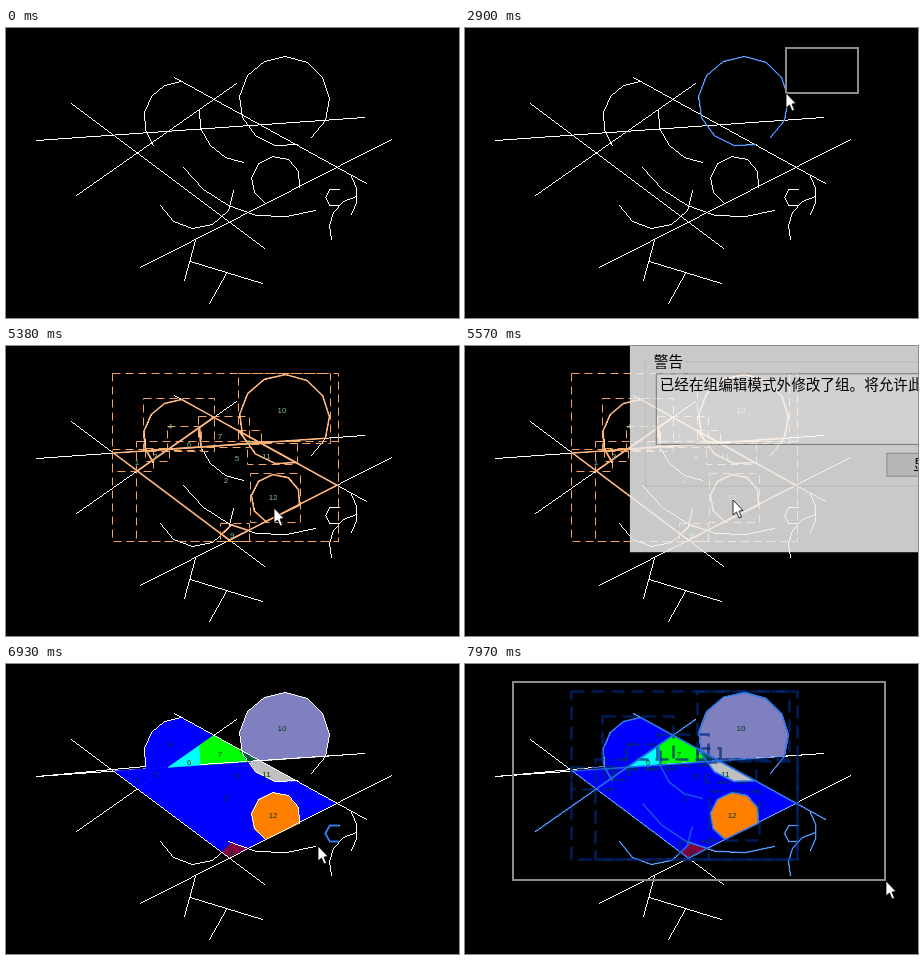
An HTML page with a canvas for the animation above (8 s loop, 453x290 px).

```html
<!DOCTYPE html>
<html lang="zh">
<head>
<meta charset="utf-8">
<style>
html, body { margin: 0; width: 100%; height: 100%; overflow: hidden; background: #000; }
canvas { display: block; }
#dialog {
  position: fixed; left: 163px; top: -20px; width: 646px; height: 227px;
  transform-origin: 323px 98px; background: #f0f0f0; color: #000;
  font: 14.7px/20px "Noto Sans CJK SC", "Noto Sans CJK", sans-serif; white-space: nowrap;
}
#dialog div { position: absolute; box-sizing: border-box; }
#group { left: 15px; top: 35px; width: 600px; height: 126px; border: 1px solid #dcdcdc; }
#title { left: 21px; top: 25px; padding: 0 3px; background: #f0f0f0; }
#text { left: 26px; top: 47px; width: 580px; height: 72px; padding-left: 3px; border: 1px solid #868686; background: #fafafa; }
#button { left: 258px; top: 127px; width: 82px; height: 24px; padding-left: 26px; border: 1px solid #a4a4a4; background: #dadada; }
#pointer { position: fixed; left: 0; top: 0; overflow: visible; }
</style>
</head>
<body>
<canvas id="stage" width="453" height="290"></canvas>
<div id="dialog">
  <div id="group"></div>
  <div id="title">警告</div>
  <div id="text">已经在组编辑模式外修改了组。将允许此操作吗？</div>
  <div id="button">显示</div>
</div>
<svg id="pointer" width="12" height="20">
  <path d="M0 0V15L3.5 12L6 18L8.5 17L6 11L10 10.5Z" fill="#fff" stroke="#000" stroke-width=".8"/>
</svg>
<script>
const byId = id => document.getElementById(id);
const c = byId('stage').getContext('2d');
const dialog = byId('dialog'), arrow = byId('pointer');
const LOOP = 8000;

// Faceted arc: centre, radius, first angle and step in degrees, number of facets
function arc(x, y, r, from, step, n) {
  return Array.from({ length: n + 1 }, (_, i) => {
    const k = (from + i * step) * Math.PI / 180;
    return [x + r * Math.cos(k), y + r * Math.sin(k)];
  });
}

const a = [[30, 112], [358, 89]];
const b = [[65, 75], [258, 220]];
const d = [[168, 49], [360, 155]];
const e = [[134, 239], [385, 111]];
const slant = [[70, 167], [230, 55]];
const stem = [[189, 212], [178, 252]];
const arm = [[184, 233], [256, 255]];
const foot = [[220, 245], [203, 275]];

const left = arc(175, 91, 38, 270, -26.6, 5);
const big = arc(278, 73, 45, 53.3, -28.3, 12);
const small = arc(269.2, 152.4, 24.6, 113.5, 37.4, 7);
const mid = arc(239.2, 87.4, 46.6, 187.6, -23.8, 4);
const long = arc(270.9, 74.7, 113.8, 145.6, -15.05, 5);
const bowl = arc(189, 162, 38, 156.8, -31.4, 5);
const hook = arc(328, 169, 9.2, -60, -60, 4);
const bracket = arc(318, 167, 33, -35, 23.5, 3);
const tail = arc(354.8, 199.6, 32, 261, -25.6, 4);
const lines = [a, b, d, e, slant, stem, arm, foot, left, big, small, mid, long, bowl, hook, bracket, tail];

// Keep the part of a polygon on one side of a line (+1 below, -1 above)
function cut(poly, [[x0, y0], [x1, y1]], side) {
  const dist = ([x, y]) => side * ((x1 - x0) * (y - y0) - (y1 - y0) * (x - x0));
  return poly.flatMap((p, i) => {
    const q = poly[(i + 1) % poly.length], u = dist(p), v = dist(q);
    const kept = u >= 0 ? [p] : [];
    if (u * v < 0) kept.push(p.map((n, j) => n + (q[j] - n) * u / (u - v)));
    return kept;
  });
}

const shape = (poly, ...cuts) => cuts.reduce((rest, [line, side]) => cut(rest, line, side), poly);
const side = (arcPts, i) => arcPts.slice(i, i + 2);

const sheet = [[0, 0], [453, 0], [453, 290], [0, 290]];
const corner = shape(sheet, [a, 1], [b, -1], [slant, -1]);
const wedge = shape(sheet, [a, -1], [slant, 1], [d, 1]);
const inner = cut(wedge, side(mid, 0), -1);

const regions = [
  [1, '#00f', cut(corner, side(left, 4), 1)],
  [3, '#00f', cut(corner, side(left, 4), -1)],
  [4, '#00f', shape(arc(175, 91, 38, 270, -26.6, 13), [a, -1], [slant, -1], [d, 1])],
  [2, '#00f', shape(sheet, [a, 1], [b, -1], [slant, 1], [d, 1], [e, -1])],
  [6, '#0ff', cut(wedge, side(mid, 0), 1)],
  [7, '#0f0', cut(inner, side(big, 9), 1)],
  [8, '#006040', cut(inner, side(big, 9), -1)],
  [10, '#8080c0', shape(big, [a, -1], [d, -1])],
  [11, '#c0c0c0', shape(big, [a, 1], [d, 1])],
  [12, '#ff8000', small],
  [9, '#800040', shape(sheet, [e, -1], [b, -1], [side(long, 2), 1], [side(bowl, 3), 1])]
].map(([label, color, pts]) => ({ label, color, pts }));

const group = regions.flatMap(r => r.pts);
const edges = [b, d, e, [a[0], left[4]], [regions[4].pts[0], a[1]], left.slice(0, 5), big, small, long.slice(2)];

// Pointer runs of [time, x, y]; hidden between runs
const runs = [
  [[270, 281, 162], [320, 30, 217], [370, 30, 217]],
  [[1970, 435, 148], [2330, 322, 237], [2490, 322, 237], [2660, 401, 90], [2770, 393, 20],
    [3230, 30, 250], [3520, 30, 250], [3800, 18, 257]],
  [[4820, 155, 56], [4970, 323, 145], [5100, 268, 162], [5380, 268, 162], [5500, 268, 154],
    [5620, 268, 154], [5950, 462, 118]],
  [[6600, 462, 120], [6760, 380, 195], [6930, 312, 182], [7300, 48, 18], [7940, 421, 217], [LOOP, 421, 217]]
];

const clamp = v => Math.max(0, Math.min(1, v));
const smooth = v => v * v * (3 - 2 * v);

function pointer(t) {
  const run = runs.find(r => t >= r[0][0] && t < r[r.length - 1][0]);
  if (!run) return null;
  const i = run.findIndex(k => k[0] > t);
  const [t0, x0, y0] = run[i - 1], [t1, x1, y1] = run[i];
  const k = smooth((t - t0) / (t1 - t0));
  return [Math.round(x0 + (x1 - x0) * k), Math.round(y0 + (y1 - y0) * k)];
}

// Whole pixels along a polyline
function pixels(pts) {
  const ends = pts.map(p => p.map(Math.round));
  return ends.slice(1).flatMap(([x1, y1], i) => {
    const [x0, y0] = ends[i];
    const n = Math.max(Math.abs(x1 - x0), Math.abs(y1 - y0));
    return Array.from({ length: n + 1 }, (_, j) =>
      [Math.round(x0 + (x1 - x0) * j / n), Math.round(y0 + (y1 - y0) * j / n)]);
  });
}

function hairline(pts, color) {
  c.fillStyle = color;
  for (const [x, y] of pixels(pts)) c.fillRect(x, y, 1, 1);
}

function path(pts, closed) {
  c.beginPath();
  for (const [x, y] of pts) c.lineTo(x + .5, y + .5);
  if (closed) c.closePath();
}

function stroke(pts, color, width, closed) {
  path(pts, closed);
  c.strokeStyle = color;
  c.lineWidth = width;
  c.stroke();
}

function bounds(pts) {
  const xs = pts.map(p => p[0]), ys = pts.map(p => p[1]);
  const x = Math.round(Math.min(...xs)) - 1, y = Math.round(Math.min(...ys)) - 1;
  return [x + .5, y + .5, Math.round(Math.max(...xs)) - x + 1, Math.round(Math.max(...ys)) - y + 1];
}

function frames(color, width, dash) {
  c.strokeStyle = color;
  c.lineWidth = width;
  c.setLineDash(dash);
  for (const pts of [group, ...regions.map(r => r.pts)]) c.strokeRect(...bounds(pts));
  c.setLineDash([]);
}

function labels(color) {
  c.fillStyle = color;
  c.font = '8px "Liberation Sans", Arial, sans-serif';
  c.textAlign = 'center';
  c.textBaseline = 'middle';
  for (const { label, pts } of regions) {
    const mean = j => pts.reduce((sum, p) => sum + p[j], 0) / pts.length;
    c.fillText(label, mean(0), mean(1) + 4);
  }
  c.fillText(5, 231, 113);
}

function outlines() {
  frames('#f5a55f', 1, [8, 5]);
  for (const r of regions) stroke(r.pts, '#ffb67c', 1.5, true);
  labels('#7fbf86');
}

function fills() {
  for (const { pts, color } of regions) {
    path(pts, true);
    c.fillStyle = color;
    c.fill();
    stroke(pts, color, .7, true);
  }
  for (const pts of edges) hairline(pts, '#fff');
  labels('#003c14');
}

// Leftward drags pick what they touch, rightward drags what they enclose
function marquee(x0, y0, x1, y1, grouped) {
  const lx = Math.min(x0, x1), rx = Math.max(x0, x1);
  const inside = ([x, y]) => x >= lx && x <= rx && y >= y0 && y <= y1;
  const test = x1 < x0 ? 'some' : 'every';
  const blue = 'rgba(32,112,228,.72)';
  if (grouped && group.every(inside)) {
    frames('rgba(0,40,120,.72)', 2.6, [13, 7]);
    for (const r of regions) stroke(r.pts, blue, 1.3, true);
  }
  for (const pts of lines) if (pixels(pts)[test](inside)) stroke(pts, blue, 1.6);
  c.strokeStyle = '#8c8c8c';
  c.lineWidth = 2;
  c.strokeRect(lx, y0, rx - lx, y1 - y0);
}

function draw(t) {
  const p = pointer(t);
  c.fillStyle = '#000';
  c.fillRect(0, 0, 453, 290);

  const selected = t >= 3800 && t < 5380;
  for (const pts of lines) hairline(pts, selected ? '#0840d8' : '#fff');

  if (t >= 5380 && t < 6620) outlines();
  if (t >= 6620) fills();
  if (t >= 6900 && t < 6985) stroke(hook, '#3478e0', 2);
  if (t >= 2770 && t < 3800) marquee(393, 20, ...p);
  if (t >= 7300) marquee(48, 18, p[0] - 1, p[1] - 1, true);

  const shown = t < 6470 ? clamp((t - 5430) / 168) : clamp((6581 - t) / 150);
  dialog.style.opacity = shown;
  dialog.style.transform = `scale(${1 - (1 - shown) * .037})`;

  arrow.style.display = p ? 'block' : 'none';
  if (p) arrow.style.transform = `translate(${p[0]}px, ${p[1]}px)`;
}

const start = performance.now();
function tick() {
  draw((performance.now() - start) % LOOP);
  requestAnimationFrame(tick);
}
tick();
</script>
</body>
</html>
```
